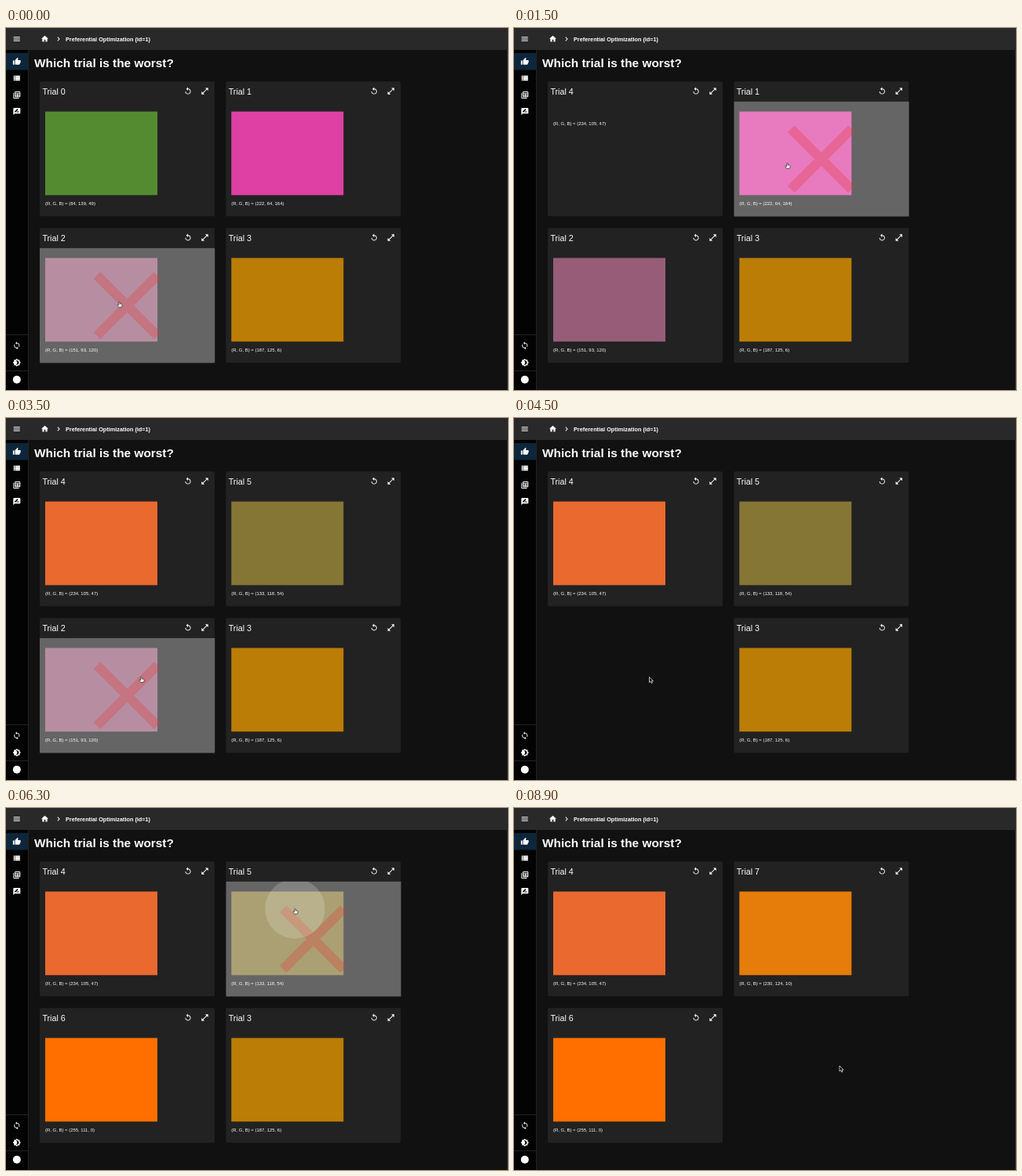
Write an HTML page that moves like this. It is 640 px wide and 462 px high and loops after 9 s.

```html
<!DOCTYPE html>
<html lang="en">
<head>
<meta charset="utf-8">
<title>Preferential Optimization</title>
<style>
  html, body { margin: 0; width: 100%; height: 100%; overflow: hidden; background: #111; }
  svg { display: block; }
  text { font-family: "Liberation Sans", Arial, sans-serif; fill: #fff; white-space: pre; }
  .icon { fill: #fff; fill-rule: evenodd; }
  .title { font-size: 10.7px; }
  .caption { font-size: 5.95px; }
</style>
</head>
<body>
<svg id="stage" width="640" height="462" viewBox="0 0 640 462">
  <rect width="640" height="462" fill="#111"/>
  <rect y="28" width="28" height="434" fill="#030303"/>
  <path d="M28.5 28V462M0 391.5H28M0 437.5H28" stroke="#222" fill="none"/>
  <rect width="640" height="28" fill="#292929"/>
  <rect y="32" width="28" height="21.5" fill="#0d263b"/>
  <rect x="639" y="28" width="1" height="434" fill="#383838"/>
  <text x="76" y="16.7" font-size="7.3" font-weight="700">Preferential Optimization (id=1)</text>
  <text x="36" y="49.7" font-size="15.4" font-weight="700">Which trial is the worst?</text>
  <circle cx="13.8" cy="448.8" r="5" fill="#fff"/>
  <g id="icons"></g>
  <g id="cards"></g>
  <path id="arrow" d="M0 0V7L1.6 5.6 2.8 8.1 4 7.5 2.9 5.1H5Z" fill="#000" stroke="#fff" stroke-width=".7"/>
  <path id="hand" d="M-.7 .2Q0-.5 .6 .2V2.3L3.2 2.9Q3.9 3.2 3.7 4L3 6.8H-.9L-2.6 4.4Q-2.7 3.3-1.8 3.5L-.7 4.3Z" fill="#fff" stroke="#222" stroke-width=".7"/>
</svg>
<script>
const LOOP = 9000, STEP = 100, CLICK_LEAD = 400, RIPPLE_TIME = 460;
const AREA = { top: 25.5, w: 223.5, h: 147 };

const ICONS = {
  menu: 'M3 18h18v-2H3v2zm0-5h18v-2H3v2zm0-7v2h18V6H3z',
  home: 'M10 20v-6h4v6h5v-8h3L12 3 2 12h3v8z',
  chevron: 'M10 6 8.59 7.41 13.17 12l-4.58 4.59L10 18l6-6z',
  thumb: 'M1 21h4V9H1v12zm22-11c0-1.1-.9-2-2-2h-6.31l.95-4.57.03-.32c0-.41-.17-.79-.44-1.06L14.17 1 7.59 7.59C7.22 7.95 7 8.45 7 9v10c0 1.1.9 2 2 2h9c.83 0 1.54-.5 1.84-1.22l3.02-7.05c.09-.23.14-.47.14-.73v-2z',
  list: 'M3 14h4v-4H3v4zm0 5h4v-4H3v4zM3 9h4V5H3v4zm5 5h13v-4H8v4zm0 5h13v-4H8v4zM8 5v4h13V5H8z',
  tables: 'M2 6v14c0 1.1.9 2 2 2h14v-2H4V6zM20 2H8c-1.1 0-2 .9-2 2v12c0 1.1.9 2 2 2h12c1.1 0 2-.9 2-2V4c0-1.1-.9-2-2-2zM8 4h12v3H8zM8 9h5v3H8zM15 9h5v3h-5zM8 14h5v2H8zM15 14h5v2h-5z',
  review: 'M20 2H4c-1.1 0-1.99.9-1.99 2L2 22l4-4h14c1.1 0 2-.9 2-2V4c0-1.1-.9-2-2-2zM6 14v-2.47l6.88-6.88c.2-.2.51-.2.71 0l1.77 1.77c.2.2.2.51 0 .71L8.47 14H6zm12 0h-7.5l2-2H18v2z',
  sync: 'M12 4V1L8 5l4 4V6c3.31 0 6 2.69 6 6 0 1.01-.25 1.97-.7 2.8l1.46 1.46C19.54 15.03 20 13.57 20 12c0-4.42-3.58-8-8-8zm0 14c-3.31 0-6-2.69-6-6 0-1.01.25-1.97.7-2.8L5.24 7.74C4.46 8.97 4 10.43 4 12c0 4.42 3.58 8 8 8v3l4-4-4-4v3z',
  theme: 'M20 8.69V4h-4.69L12 .69 8.69 4H4v4.69L.69 12 4 15.31V20h4.69L12 23.31 15.31 20H20v-4.69L23.31 12 20 8.69zM12 18c-.89 0-1.74-.2-2.5-.55C11.56 16.5 13 14.42 13 12s-1.44-4.5-3.5-5.45C10.26 6.2 11.11 6 12 6c3.31 0 6 2.69 6 6s-2.69 6-6 6z',
  replay: 'M12 5V1L7 6l5 5V7c3.31 0 6 2.69 6 6s-2.69 6-6 6-6-2.69-6-6H4c0 4.42 3.58 8 8 8s8-3.58 8-8-3.58-8-8-8z',
  expand: 'M21 11V3h-8l3.29 3.29-10 10L3 13v8h8l-3.29-3.29 10-10z',
  clear: 'M19 6.41 17.59 5 12 10.59 6.41 5 5 6.41 10.59 12 5 17.59 6.41 19 12 13.41 17.59 19 19 17.59 13.41 12z'
};

// id, column, row, colour, time shown, time its image loads, time removed
const TRIALS = [
  [0, 0, 0, '84, 139, 49', 0, 0, 600],
  [1, 1, 0, '222, 64, 164', 0, 0, 2400],
  [2, 0, 1, '151, 93, 120', 0, 0, 4400],
  [3, 1, 1, '187, 125, 6', 0, 0, 8800],
  [4, 0, 0, '234, 105, 47', 1200, 1700, LOOP],
  [5, 1, 0, '133, 118, 54', 2900, 3400, 6600],
  [6, 0, 1, '255, 111, 0', 4900, 5400, LOOP],
  [7, 1, 0, '230, 124, 10', 7500, 8000, LOOP]
];

// start, end, x, y of each pointer stop
const MOVES = [
  [0, 0, 144.5, 349.5],
  [0, 300, 144.3, 185.5],
  [900, 1400, 348.5, 172.5],
  [2500, 3000, 172.5, 330.5],
  [4500, 5000, 368.5, 128.5],
  [7000, 7500, 415, 329]
];

const $ = id => document.getElementById(id);
const show = (el, on) => el.setAttribute('visibility', on ? 'inherit' : 'hidden');

const icon = (name, cx, cy, size = 10.8, attrs = '') =>
  `<path class="icon" ${attrs} d="${ICONS[name]}" transform="translate(${cx - size / 2} ${cy - size / 2}) scale(${size / 24})"/>`;

$('icons').innerHTML = [
  ['menu', 13.7, 14], ['home', 49.5, 13.8], ['chevron', 67, 14],
  ['thumb', 13.8, 42.8], ['list', 13.8, 64], ['tables', 13.8, 85.5], ['review', 13.8, 106.6],
  ['sync', 13.8, 405.3], ['theme', 13.8, 427]
].map(a => icon(...a)).join('');

const cards = TRIALS.map(([id, col, row, rgb, from, loaded, to]) => {
  const x = 43 + col * 237.3, y = 68.3 + row * 186.9;
  const el = document.createElementNS('http://www.w3.org/2000/svg', 'g');
  el.setAttribute('transform', `translate(${x} ${y})`);
  el.innerHTML = `
    <rect width="223" height="172" rx="2" fill="#222"/>
    <text class="title" x="3.4" y="16.4">Trial ${id}</text>
    ${icon('replay', 189, 12.2)}${icon('expand', 210.5, 12.3, 11.2)}
    <rect class="swatch" x="7" y="38.3" width="143" height="106.7" fill="rgb(${rgb})"/>
    <text class="caption" x="7">(R, G, B) = (${rgb})</text>
    <svg class="hover" y="${AREA.top}" width="${AREA.w}" height="${AREA.h}">
      <rect width="100%" height="100%" fill="#fff" opacity=".3"/>
      ${icon('clear', 111.5, 73.5, 147, 'style="fill:#e53935" opacity=".3"')}
      <circle class="ripple" fill="#fff" opacity=".18"/>
    </svg>`;
  $('cards').append(el);
  const part = name => el.querySelector('.' + name);
  return { x, y, from, loaded, to, el, swatch: part('swatch'), caption: part('caption'), hover: part('hover'), ripple: part('ripple') };
});

function pointerAt(t) {
  let [, , x, y] = MOVES[0];
  for (const [start, end, tx, ty] of MOVES.slice(1)) {
    if (t <= start) break;
    const p = Math.min(1, (t - start) / (end - start)), e = p * p * (3 - 2 * p);
    x += (tx - x) * e;
    y += (ty - y) * e;
  }
  return [x, y];
}

function drawCard(card, t, px, py) {
  const live = t >= card.from && t < card.to, ready = t >= card.loaded;
  const dx = px - card.x, dy = py - card.y - AREA.top;
  const over = live && dx > 0 && dx < AREA.w && dy > 0 && dy < AREA.h;
  show(card.el, live);
  show(card.swatch, ready);
  card.caption.setAttribute('y', ready ? 157.7 : 56.1);
  show(card.hover, over);

  const held = card.to < LOOP ? Math.max(0, t - card.to + CLICK_LEAD) : 0;
  const reach = Math.hypot(Math.max(dx, AREA.w - dx), Math.max(dy, AREA.h - dy));
  card.ripple.setAttribute('cx', dx);
  card.ripple.setAttribute('cy', dy);
  card.ripple.setAttribute('r', over ? reach * Math.min(1, held / RIPPLE_TIME) : 0);
  return over;
}

function draw(t) {
  const [px, py] = pointerAt(t);
  const over = cards.map(card => drawCard(card, t, px, py)).some(Boolean);
  for (const id of ['arrow', 'hand']) {
    $(id).setAttribute('transform', `translate(${px} ${py})`);
    show($(id), over === (id === 'hand'));
  }
}

const t0 = performance.now();
function tick() {
  const t = (performance.now() - t0) % LOOP;
  draw(Math.floor(t / STEP) * STEP);
  requestAnimationFrame(tick);
}
tick();
</script>
</body>
</html>
```
